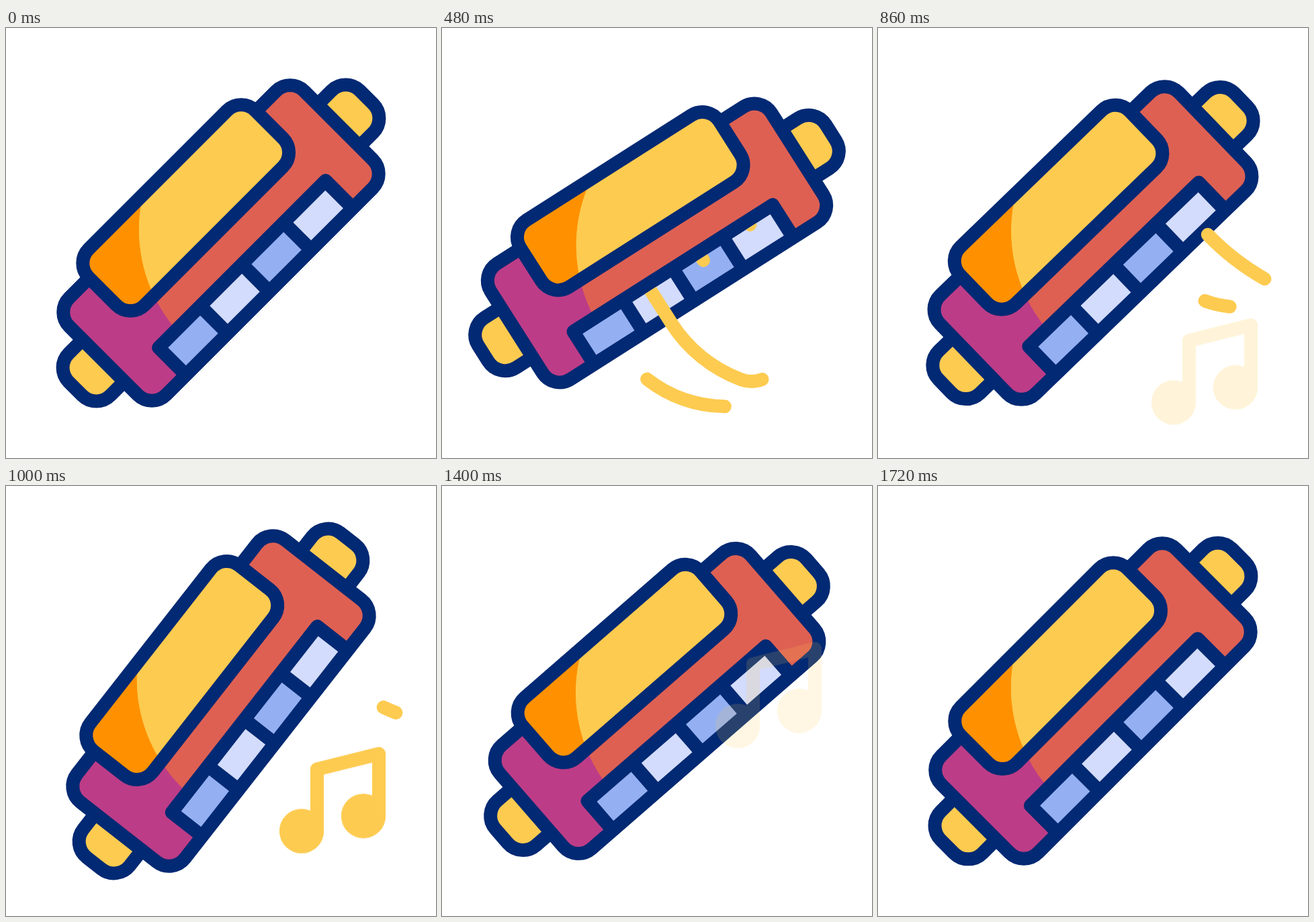
Animation of 640x640 px, one loop 2 s. Source, as an HTML page with a canvas:

```html
<!DOCTYPE html>
<html lang="en">
<head>
<meta charset="utf-8">
<title>Harmonica</title>
<style>
  html, body { margin: 0; width: 100%; height: 100%; overflow: hidden; background: #fff; }
  canvas { display: block; width: 640px; height: 640px; }
</style>
</head>
<body>
<canvas id="stage" width="640" height="640"></canvas>
<script>
const ctx = document.getElementById('stage').getContext('2d');
const LOOP = 2000, STEP = 20, RAD = Math.PI / 180;
const NAVY = '#022973', YELLOW = '#fdcb50', ORANGE = '#ff9100', RED = '#de6053',
      PURPLE = '#bd3c87', BLUE = '#94b0f3', PALE = '#d3dcfc';

// Eased progress from 0 to 1 between times a and b.
function ease(t, a, b) {
  const p = Math.min(1, Math.max(0, (t - a) / (b - a)));
  return p * p * (3 - 2 * p);
}

// [time, tilt in degrees]
const TILT = [[0, 45], [600, 31], [1066.7, 53.2], [1400, 41], [1733.3, 45]];

function tiltAt(t) {
  for (let i = 1; i < TILT.length; i++) {
    const [a, from] = TILT[i - 1], [b, to] = TILT[i];
    if (t < b) return from + (to - from) * ease(t, a, b);
  }
  return 45;
}

// Air streams: straight down from a hole, then bending through arcs [radius, end angle].
const STREAMS = [
  { x: -132,  y: 100, arcs: [[190, 57]],            head: [67, 480],  tail: [285, 680] },
  { x: -46,   y: 112, arcs: [[210, 37], [44.5, 121]], head: [133, 577], tail: [433, 829] },
  { x: 44.5,  y: 110, arcs: [[155, 40]],            head: [400, 848], tail: [600, 973] },
  { x: 131.5, y: 110, arcs: [[375, 16.4]],          head: [433, 814], tail: [700, 1082] }
];
const STREAM_TOP = 44;

function boxPath(x0, y0, x1, y1, r) {
  ctx.beginPath();
  ctx.roundRect(x0, y0, x1 - x0, y1 - y0, r);
}

function outlined(fill, shade, ...box) {
  boxPath(...box);
  ctx.fillStyle = fill;
  ctx.fill();
  if (shade) {
    // Everything outside a large circle lies in shadow.
    ctx.save();
    ctx.clip();
    ctx.beginPath();
    ctx.rect(-320, -200, 410, 400);
    ctx.arc(89.1, 60.8, 228, 0, 2 * Math.PI);
    ctx.fillStyle = shade;
    ctx.fill('evenodd');
    ctx.restore();
    if (shade) {
      ctx.save();
      boxPath(...box);
      ctx.clip();
      ctx.beginPath();
      ctx.arc(89.1, 60.8, 228, 0, 2 * Math.PI);
      ctx.fillStyle = fill;
      ctx.fill();
      ctx.restore();
    }
  }
  boxPath(...box);
  ctx.strokeStyle = NAVY;
  ctx.stroke();
}

function drawBody() {
  ctx.lineWidth = 20;
  ctx.lineJoin = 'round';
  outlined(YELLOW, null, -306.5, -44, 306.5, 44, 30);
  outlined(RED, PURPLE, -247.5, -102, 247.5, 102, 30);
  outlined(YELLOW, ORANGE, -175.5, -133, 175.5, -15, 30);

  boxPath(-185.8, 34.4, 185.8, 110, [10, 10, 0, 0]);
  ctx.fillStyle = NAVY;
  ctx.fill();
  for (let i = 0; i < 4; i++) {
    ctx.fillStyle = i % 2 ? PALE : BLUE;
    ctx.fillRect(-165.8 + i * 87.8, 54.4, 67.6, 37.6);
  }
}

function drawStream(s, t) {
  let length = s.y - STREAM_TOP, start = 0;
  let cx = s.x, cy = s.y, radius = 0;
  ctx.beginPath();
  ctx.moveTo(s.x, STREAM_TOP);
  ctx.lineTo(s.x, s.y);
  for (const [r, deg] of s.arcs) {
    const end = deg * RAD;
    cx += (r - radius) * Math.cos(start);
    cy -= (r - radius) * Math.sin(start);
    ctx.arc(cx, cy, r, Math.PI - start, Math.PI - end, true);
    length += r * (end - start);
    start = end;
    radius = r;
  }
  const head = length * ease(t, ...s.head), tail = length * ease(t, ...s.tail);
  if (head - tail < 0.5) return;
  ctx.setLineDash([head - tail, 9999]);
  ctx.lineDashOffset = -tail;
  ctx.stroke();
}

function drawStreams(t) {
  ctx.save();
  ctx.beginPath();
  ctx.rect(-400, 54.4, 800, 500);
  ctx.clip();
  ctx.lineWidth = 20;
  ctx.lineCap = 'round';
  ctx.strokeStyle = YELLOW;
  STREAMS.forEach(s => drawStream(s, t));
  ctx.restore();
}

// One path for the whole note, so that overlaps stay even while it fades.
const note = new Path2D();
note.arc(440, 0, 33, 0, 2 * Math.PI);
note.closePath();
note.moveTo(565, -22.5);
note.arc(532, -22.5, 33, 0, 2 * Math.PI);
note.closePath();
note.moveTo(473, 0);
note.lineTo(473, -84.5);
note.lineTo(545, -102);
note.lineTo(545, -22.5);
note.lineTo(565, -22.5);
note.lineTo(565, -115);
note.arc(555, -115, 10, 0, -104 * RAD, true);
note.arc(463, -92, 10, -104 * RAD, -Math.PI, true);
note.lineTo(453, 0);
note.closePath();

function drawNote(t) {
  const alpha = ease(t, 800, 1000) * (1 - ease(t, 1200, 1466.7));
  if (alpha <= 0) return;
  const layer = drawNote.layer || (drawNote.layer = makeNoteLayer());
  ctx.save();
  ctx.globalAlpha = alpha;
  ctx.drawImage(layer, 0, 562.5 - 207 * ease(t, 800, 1433.3) - 160);
  ctx.restore();
}

function makeNoteLayer() {
  const layer = document.createElement('canvas');
  layer.width = 640;
  layer.height = 220;
  const c = layer.getContext('2d');
  c.translate(0, 160);
  c.fillStyle = YELLOW;
  c.fill(note);
  c.beginPath();
  c.arc(440, 0, 33, 0, 2 * Math.PI);
  c.fill();
  c.beginPath();
  c.arc(532, -22.5, 33, 0, 2 * Math.PI);
  c.fill();
  c.lineWidth = 20;
  c.lineJoin = 'round';
  c.strokeStyle = YELLOW;
  c.beginPath();
  c.moveTo(463, 0);
  c.lineTo(463, -92);
  c.lineTo(555, -115);
  c.lineTo(555, -22.5);
  c.stroke();
  return layer;
}

function draw() {
  const t = Math.floor(performance.now() % LOOP / STEP) * STEP;
  ctx.fillStyle = '#fff';
  ctx.fillRect(0, 0, 640, 640);
  ctx.save();
  ctx.translate(320, 320);
  ctx.rotate(-tiltAt(t) * RAD);
  drawBody();
  drawStreams(t);
  ctx.restore();
  drawNote(t);
  requestAnimationFrame(draw);
}
draw();
</script>
</body>
</html>
```
